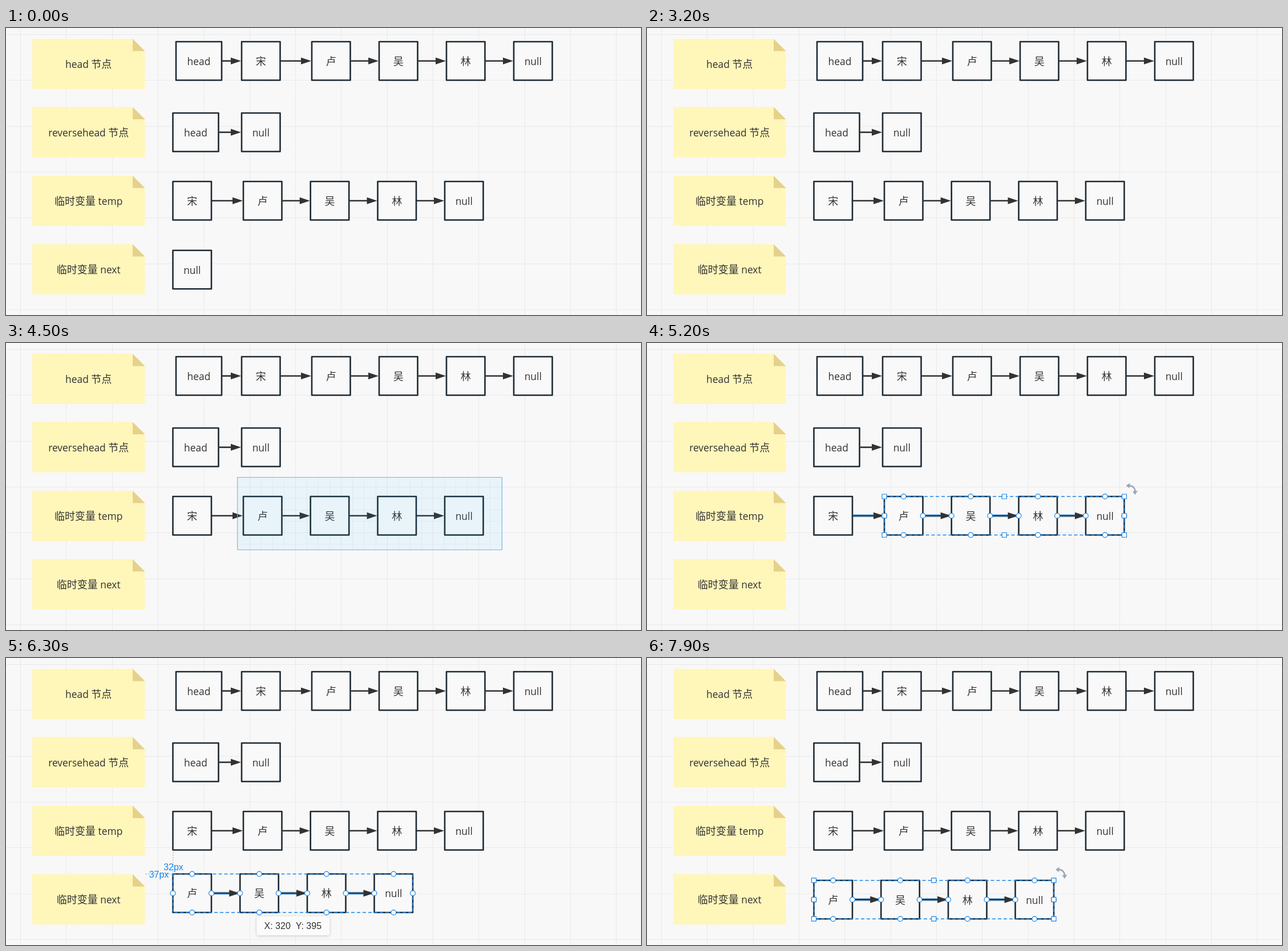
Animation of 1113 by 503 pixels, one loop 8 s. Source, as an HTML page with a canvas:

```html
<!DOCTYPE html>
<html lang="zh">
<head>
<meta charset="utf-8">
<title>Linked list reversal</title>
<style>
  html, body { margin: 0; width: 100%; height: 100%; overflow: hidden; background: #f8f8f8; }
  canvas { display: block; width: 1113px; height: 503px; }
</style>
</head>
<body>
<canvas id="stage"></canvas>
<script>
const W = 1113, H = 503, LOOP = 8000, STEP = 100;
const SIZE = 67.5, UNIT = 1.339, GRID = 80.33;
const BLUE = '#1a84e6', INK = '#1e2a33', LINE = '#323232', TEXT = '#323232';
const LATIN = '17.4px "Open Sans", "Noto Sans", sans-serif';
const HAN = '18px "Noto Sans CJK SC", "Noto Sans CJK", sans-serif';
const ARIAL = '16px "Liberation Sans", Arial, sans-serif';

const canvas = document.getElementById('stage');
const ctx = canvas.getContext('2d');
const dpr = window.devicePixelRatio || 1;
canvas.width = W * dpr;
canvas.height = H * dpr;

const makeRow = (labels, xs, y, firstWidth = SIZE) =>
  labels.map((label, i) => ({ label, x: xs[i], y, w: i ? SIZE : firstWidth }));

const head = makeRow(['head', '宋', '卢', '吴', '林', 'null'], [298, 413, 536, 654, 772, 890], 24, 80);
const reversed = makeRow(['head', 'null'], [292.5, 413], 149, 80);
const temp = makeRow(['宋', '卢', '吴', '林', 'null'], [292.5, 416, 533.7, 651.5, 769], 269);
const empty = makeRow(['null'], [292.5], 389.7);
const tail = (x, y) => temp.slice(1).map(b => ({ ...b, x: b.x - 416 + x, y }));

const notes = [['head 节点', 19], ['reversehead 节点', 138.5], ['临时变量 temp', 259], ['临时变量 next', 379]];

// [time, x, y]
const marqueePath = [[3600, 500, 305], [3700, 640, 345], [3800, 755, 360], [3900, 821.5, 362.5],
  [4100, 855.5, 362.5], [4400, 868.5, 362.5], [4500, 869.5, 362.5]];
const dragPath = [[5700, 440, 296], [5900, 392, 322], [6200, 300, 373], [6300, 292.5, 378.5],
  [6500, 286, 393], [6800, 280, 394.6], [7100, 281.8, 394.6], [7400, 292.5, 389.7]];

function along(path, t) {
  if (t <= path[0][0]) return path[0].slice(1);
  for (let i = 1; i < path.length; i++) {
    const [t0, x0, y0] = path[i - 1], [t1, x1, y1] = path[i];
    if (t <= t1) {
      const k = (t - t0) / (t1 - t0);
      return [x0 + (x1 - x0) * k, y0 + (y1 - y0) * k];
    }
  }
  return path[path.length - 1].slice(1);
}

function stroke(points, color, width, dash = []) {
  ctx.beginPath();
  points.forEach(([x, y]) => ctx.lineTo(x, y));
  ctx.strokeStyle = color;
  ctx.lineWidth = width;
  ctx.setLineDash(dash);
  ctx.stroke();
  ctx.setLineDash([]);
}

function polygon(points, color) {
  ctx.beginPath();
  points.forEach(([x, y]) => ctx.lineTo(x, y));
  ctx.fillStyle = color;
  ctx.fill();
}

// Centred label; Latin and Han runs have their own fonts.
function label(text, cx, cy) {
  const runs = text.match(/[\u4e00-\u9fff]+|[^\u4e00-\u9fff]+/g).map(s => {
    ctx.font = s > '\u4e00' ? HAN : LATIN;
    return { s, font: ctx.font, w: ctx.measureText(s).width };
  });
  let x = cx - runs.reduce((sum, r) => sum + r.w, 0) / 2;
  ctx.textAlign = 'left';
  ctx.textBaseline = 'alphabetic';
  ctx.fillStyle = TEXT;
  for (const r of runs) {
    ctx.font = r.font;
    ctx.fillText(r.s, x, cy + 6.8);
    x += r.w;
  }
}

function plainText(text, x, y, color) {
  ctx.font = ARIAL;
  ctx.textAlign = 'center';
  ctx.textBaseline = 'alphabetic';
  ctx.fillStyle = color;
  ctx.fillText(text, x, y + 5.7);
}

function gridLines(pitch, color) {
  for (let x = 25.5 - GRID; x < W; x += pitch) {
    const px = Math.floor(x) + 0.5;
    stroke([[px, 0], [px, H]], color, 1);
  }
  for (let y = 11.5 - GRID; y < H; y += pitch) {
    const py = Math.floor(y) + 0.5;
    stroke([[0, py], [W, py]], color, 1);
  }
}

function note(text, y) {
  polygon([[46, y], [222, y], [243.5, y + 21.5], [243.5, y + 88], [46, y + 88]], '#fff6ba');
  polygon([[222, y], [243.5, y + 21.5], [222, y + 21.5]], '#e6d18a');
  label(text, 144.7, y + 44.5);
}

function arrow(x0, x1, y, lit) {
  if (lit) stroke([[x0, y], [x1, y]], '#8fc9fb', 5.5);
  stroke([[x0, y], [x1 - 14, y]], LINE, 2.7);
  polygon([[x1 - 1, y], [x1 - 19, y - 6], [x1 - 19, y + 6]], LINE);
}

function chain(boxes, lit = false) {
  boxes.forEach((b, i) => {
    ctx.lineJoin = 'round';
    ctx.fillStyle = '#f9f9f9';
    ctx.fillRect(b.x, b.y, b.w, SIZE);
    ctx.strokeStyle = INK;
    ctx.lineWidth = 2.6;
    ctx.strokeRect(b.x, b.y, b.w, SIZE);
    label(b.label, b.x + b.w / 2, b.y + SIZE / 2 + 0.4);
    if (i) arrow(boxes[i - 1].x + boxes[i - 1].w + 1, b.x, b.y + SIZE / 2, lit);
  });
}

function knob(x, y, square) {
  ctx.beginPath();
  if (square) ctx.rect(x - 4, y - 4, 8, 8);
  else ctx.arc(x, y, 4.4, 0, Math.PI * 2);
  ctx.fillStyle = '#fff';
  ctx.fill();
  ctx.strokeStyle = BLUE;
  ctx.lineWidth = 1.2;
  ctx.stroke();
}

function anchors(b) {
  const mx = b.x + b.w / 2, my = b.y + SIZE / 2;
  knob(mx, b.y);
  knob(mx, b.y + SIZE);
  knob(b.x, my);
  knob(b.x + b.w, my);
}

function rotateIcon(x, y) {
  const c = '#9aa5bf';
  ctx.beginPath();
  ctx.arc(x + 9, y - 9, 10, -Math.PI / 2, 0);
  ctx.strokeStyle = c;
  ctx.lineWidth = 2.6;
  ctx.stroke();
  polygon([[x + 3, y - 19], [x + 10, y - 23.5], [x + 9, y - 14.5]], c);
  polygon([[x + 19, y - 3], [x + 14.5, y - 9], [x + 23.5, y - 10]], c);
}

function selection(boxes, resizable) {
  const last = boxes[boxes.length - 1];
  const { x, y } = boxes[0], r = last.x + last.w, b = y + SIZE;
  stroke([[x, y], [r, y], [r, b], [x, b], [x, y]], BLUE, 1.4, [6, 4]);
  boxes.forEach(anchors);
  if (!resizable) return;
  const mx = (x + r) / 2, my = (y + b) / 2;
  for (const px of [x, mx, r])
    for (const py of [y, my, b])
      if (px !== mx || py !== my) knob(px, py, true);
  rotateIcon(r, y);
}

function quickArrows(b) {
  const half = SIZE / 2;
  for (let i = 0; i < 4; i++) {
    ctx.save();
    ctx.translate(b.x + half, b.y + half);
    ctx.rotate(i * Math.PI / 2);
    polygon([[half + 30, 0], [half + 21, -6], [half + 21, 6]], '#a9d4f8');
    ctx.restore();
  }
}

function marquee(t) {
  const [x, y] = along(marqueePath, t);
  const left = 405.5, top = 235.5;
  ctx.save();
  ctx.beginPath();
  ctx.rect(left, top, x - left, y - top);
  ctx.fillStyle = 'rgba(20,180,255,0.07)';
  ctx.fill();
  ctx.strokeStyle = '#6db6ec';
  ctx.lineWidth = 1;
  ctx.stroke();
  ctx.restore();
}

function marqueeGrid(t) {
  const [x, y] = along(marqueePath, t);
  ctx.save();
  ctx.beginPath();
  ctx.rect(405, 235, x - 405, y - 235);
  ctx.clip();
  gridLines(GRID / 4, '#eeeeee');
  ctx.restore();
}

function guides(x, y) {
  const centred = y > 385, gy = Math.floor(centred ? y + SIZE / 2 : y) + 0.5;
  const color = '#7fa9cf';
  stroke([[x + 0.5, 337], [x + 0.5, y]], color, 1, [2, 2]);
  stroke([[244, gy], [x, gy]], color, 1, [3, 2]);
  plainText(Math.ceil((y - 336.5) / UNIT) + 'px', x + 1, (336.5 + y) / 2 + 8.5, BLUE);
  plainText(Math.ceil((x - 243.5) / UNIT) + 'px', (243.5 + x) / 2, gy + 1, BLUE);
}

function tooltip(x, y) {
  const cx = x + 210.8, top = Math.min(y + SIZE + 6.5, 468.5);
  ctx.save();
  ctx.shadowColor = 'rgba(0,0,0,0.2)';
  ctx.shadowBlur = 5;
  ctx.shadowOffsetY = 1;
  ctx.fillStyle = '#fbfbfb';
  ctx.beginPath();
  ctx.roundRect(cx - 64, top, 128, 33.5, 4);
  ctx.fill();
  ctx.restore();
  const px = Math.round(320 + (x - 292.5) / UNIT);
  const py = Math.round(395 + (y - 378.5) / UNIT);
  plainText(`X: ${px}  Y: ${py}`, cx - 0.5, top + 17, TEXT);
}

function draw(t) {
  const inside = (a, b) => t >= a && t < b;
  ctx.setTransform(dpr, 0, 0, dpr, 0, 0);
  ctx.fillStyle = '#f8f8f8';
  ctx.fillRect(0, 0, W, H);
  gridLines(GRID / 4, '#f7f7f7');
  if (inside(3600, 4800)) marqueeGrid(t);
  gridLines(GRID, '#e9e9e9');

  notes.forEach(([text, y]) => note(text, y));
  chain(head);
  chain(reversed);
  chain(temp, inside(4800, 5400));
  if (t < 2800) chain(empty);

  // Pointer passing over the boxes
  if (inside(1400, 1900)) anchors(temp[4 - Math.floor((t - 1400) / STEP)]);
  if (inside(1900, 2300)) anchors(empty[0]);
  if (inside(3100, 3200)) anchors(temp[1]);

  if (inside(2300, 2800)) {
    selection(empty, true);
    quickArrows(empty[0]);
  }
  if (inside(3600, 4800)) marquee(t);
  if (inside(4800, 5400)) selection(temp.slice(1), true);

  if (t < 5400) return;
  const [x, y] = t < 5700 ? [442.3, 295.3] : along(dragPath, t);
  const copy = tail(x, y), dragging = inside(5700, 7700);
  chain(copy, true);
  const snapped = t === 6300 || inside(7400, 7700);
  if (snapped) guides(x, y);
  selection(copy, !dragging);
  if (dragging) tooltip(x, y);
}

const start = performance.now();
function tick() {
  const t = (performance.now() - start) % LOOP;
  draw(Math.floor(t / STEP) * STEP);
  requestAnimationFrame(tick);
}
tick();
</script>
</body>
</html>
```
